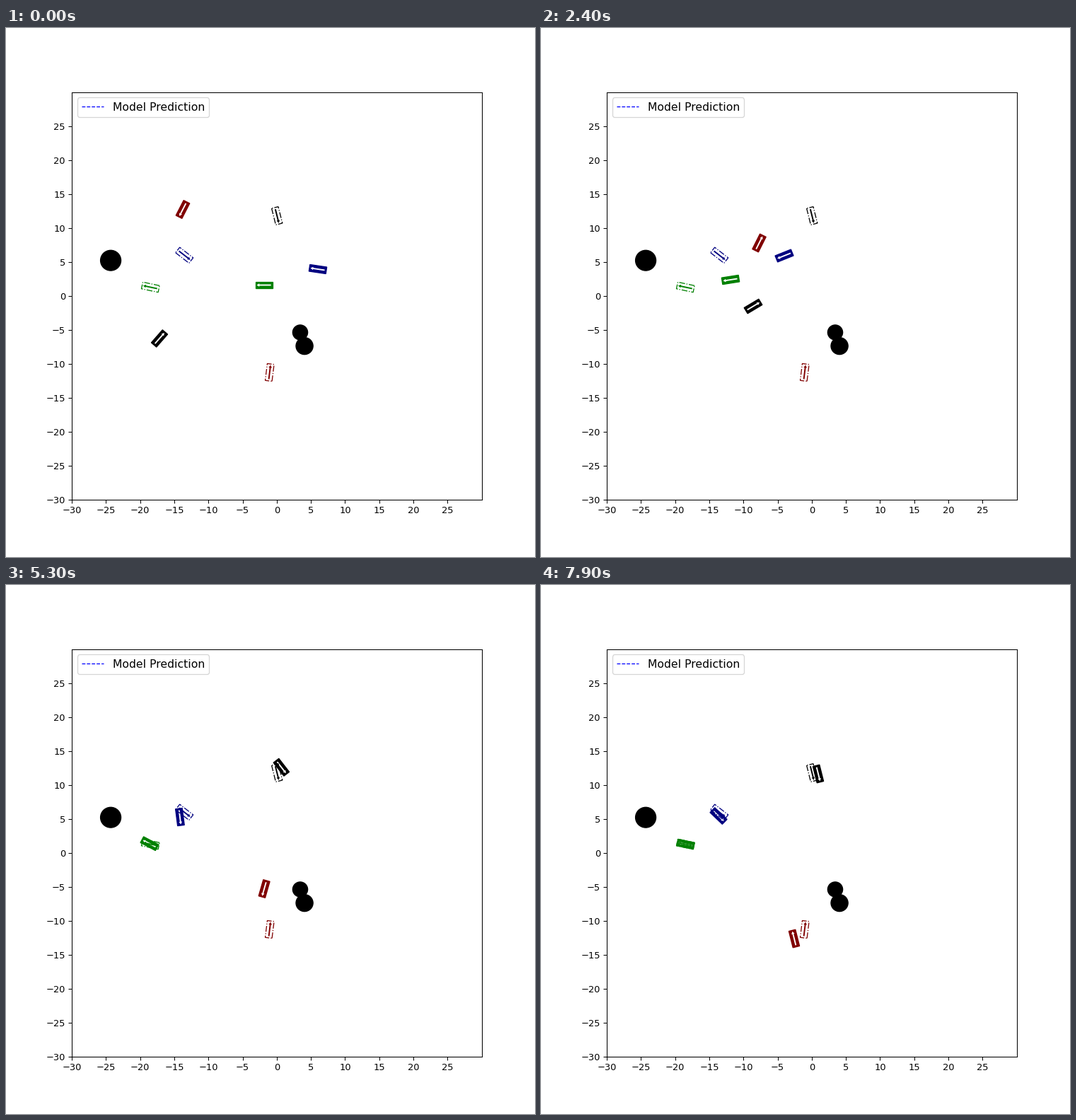
A matplotlib script for the animation above (8000 ms loop, 748x748 px).

```python
import numpy as np
import matplotlib.pyplot as plt
from matplotlib.animation import FuncAnimation
from matplotlib.lines import Line2D
from matplotlib.patches import Circle, Polygon

SIZE, DPI = 748, 93.5
FRAMES, STEP = 80, 100
LEFT, BOTTOM, BOX_W, BOX_H = 93, 81.4, 579.7, 576  # axes box in pixels
LENGTH, WIDTH = 2.5, 1.0

BODY = np.array([(-1, -1), (1, -1), (1, 1), (-1, 1)]) * (LENGTH / 2, WIDTH / 2)
HALF = np.array([(-1, 0.1), (0.7, 0.1), (0.7, 0.24), (1.1, 0)])
ARROW = np.vstack([HALF, HALF[::-1] * (1, -1)])

# Waypoints: stage x, stage y, heading (degrees). Every car passes its points
# at the shared times and reaches its last one at END.
TIMES = [0.1, 1.6, 2.4, 3.5, 4.6, 6.0, 6.6, 7.3]
END = 7.9
ROUTES = {
    "maroon": [(249.5, 256, -117), (262.5, 295, -53), (308, 303.5, 63.5),
               (358.5, 239.5, -20), (399, 334.5, -107), (374, 515, -51),
               (428, 530, 58), (390, 506, 186), (357.5, 499.5, 104)],
    "navy": [(440.5, 340.5, 171.5), (396.5, 335, 163.5), (343.5, 321.5, 202),
             (268, 302.5, 166), (246.5, 330.5, 317), (244.5, 324.5, 309),
             (250.5, 326, 316)],
    "green": [(364.5, 363, 180), (320.5, 364.5, 177.5), (267.5, 355.5, 189),
              (208.5, 369.5, 156), (202, 365, 163), (204, 366, 168)],
    "black": [(216.5, 438.5, 49), (248.5, 408, 33), (299.5, 393, 31),
              (358, 313.5, 75), (379.5, 250.5, -15.5), (394.5, 268, -70),
              (390, 259, -73), (391.5, 266.5, -76)],
}
GOALS = {"maroon": (372.3, 486.5, 83), "navy": (251.7, 320.8, -38),
         "green": (203.8, 366, 168), "black": (382.7, 265, -76)}
OBSTACLES = [(-24.3, 5.2, 1.5), (3.43, -5.4, 1.1), (4.06, -7.4, 1.25)]


def to_data(px, py):
    x = (px + 0.5 - LEFT) / BOX_W * 60 - 30
    y = (SIZE - py - 0.5 - BOTTOM) / BOX_H * 60 - 30
    return np.array([x, y])


def place(shape, px, py, heading):
    a = np.radians(heading)
    c, s = np.cos(a), np.sin(a)
    return shape @ np.array([(c, s), (-s, c)]) + to_data(px, py)


def facing(heading):
    a = np.radians(heading)
    return np.array([np.cos(a), -np.sin(a)])


def drive(start, goal, u):
    """Pose on a curve leaving and arriving along the two headings."""
    p, q = np.array(start[:2]), np.array(goal[:2])
    d0, d1 = facing(start[2]), facing(goal[2])
    chord = q - p
    half = np.radians((goal[2] - start[2] + 180) % 360 - 180) / 2
    gear = 1 if chord @ (d0 + d1) >= 0 else -1
    arc = gear * np.hypot(*chord) / np.sinc(half / np.pi)
    m0, m1 = arc * d0, arc * d1
    pos = (p + u * m0 + u**2 * (3 * chord - 2 * m0 - m1)
           + u**3 * (m0 + m1 - 2 * chord))
    vel = (m0 + 2 * u * (3 * chord - 2 * m0 - m1)
           + 3 * u**2 * (m0 + m1 - 2 * chord)) * gear
    return pos[0], pos[1], np.degrees(np.arctan2(-vel[1], vel[0]))


def pose(route, t):
    times = TIMES[:len(route) - 1] + [END]
    t = np.clip(t, times[0], END)
    i = min(np.searchsorted(times, t, side="right"), len(times) - 1) - 1
    u = (t - times[i]) / (times[i + 1] - times[i])
    if i == 0:  # accelerate from rest
        u *= u
    return drive(route[i], route[i + 1], u)


fig = plt.figure(figsize=(SIZE / DPI, SIZE / DPI), dpi=DPI)
ax = fig.add_axes([v / SIZE for v in (LEFT, BOTTOM, BOX_W, BOX_H)])
ax.set(xlim=(-30, 30), ylim=(-30, 30),
       xticks=range(-30, 30, 5), yticks=range(-30, 30, 5))

for x, y, r in OBSTACLES:
    ax.add_patch(Circle((x, y), r, color="black"))

cars = []
for color, route in ROUTES.items():
    body = ax.add_patch(Polygon(BODY, fc=color, ec=color, lw=1, zorder=2))
    arrow = ax.add_patch(Polygon(ARROW, fc="white", lw=0, zorder=2))
    cars.append((route, body, arrow))

for color, spot in GOALS.items():
    ax.add_patch(Polygon(place(BODY, *spot), fill=False, ec=color, lw=1,
                         ls="-.", zorder=3))
    ax.add_patch(Polygon(place(ARROW, *spot), fc=color, lw=0, zorder=3))

ax.legend(handles=[Line2D([], [], color="b", ls="--", lw=1)],
          labels=["Model Prediction"], loc="upper left", fontsize=12)


def update(frame):
    for route, body, arrow in cars:
        spot = pose(route, frame * STEP / 1000)
        body.set_xy(place(BODY, *spot))
        arrow.set_xy(place(ARROW, *spot))
    return [p for car in cars for p in car[1:]]


anim = FuncAnimation(fig, update, frames=FRAMES, interval=STEP,
                     repeat=True, repeat_delay=0, blit=False)
plt.show()
```
